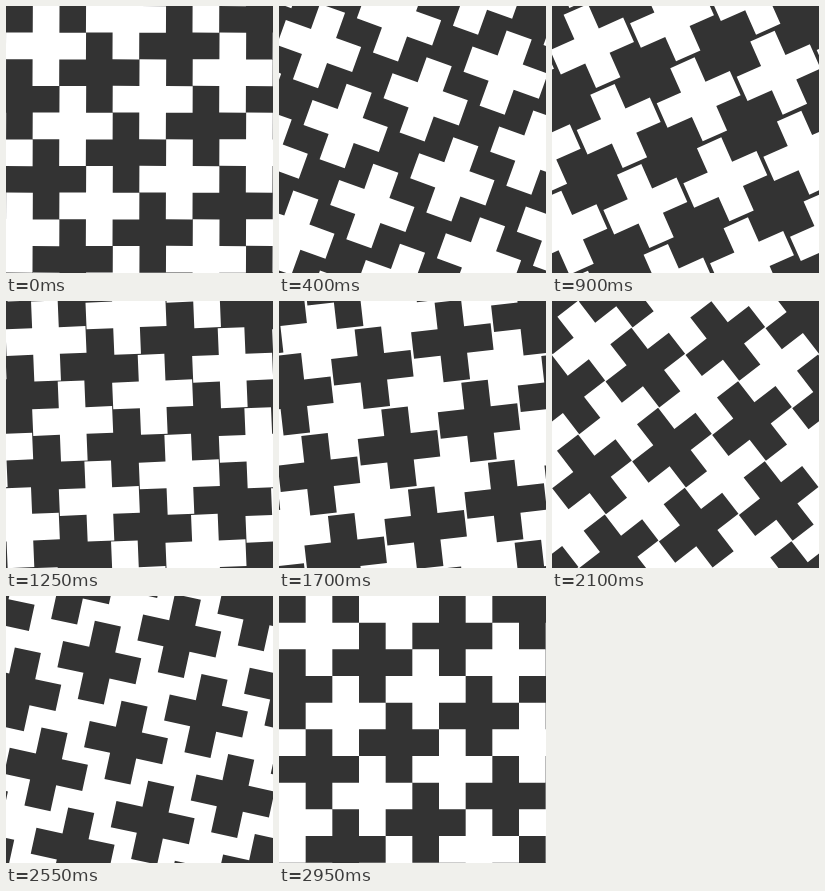
Write an HTML page with a canvas that moves like this. It is 267x267 px and loops after 3000 ms.

```html
<!DOCTYPE html>
<html lang="en">
<head>
<meta charset="utf-8">
<title>Turning crosses</title>
<style>
  html, body { margin: 0; width: 100%; height: 100%; overflow: hidden; background: #333; }
  canvas { display: block; width: 100vw; height: 100vh; }
</style>
</head>
<body>
<canvas id="stage"></canvas>
<script>
const SIZE = 267;
const CELL = 80 / 3;
const STEP_MS = 50;
const STEPS = 30; // per phase
const DARK = '#333333';
const LIGHT = '#ffffff';

// Light crosses turn clockwise, then the dark ones turn back.
const PHASES = [
  { back: DARK, fill: LIGHT, x: 1.5, y: 1.5, turn: 1 },
  { back: LIGHT, fill: DARK, x: 3.5, y: 2.5, turn: -1 }
];

const canvas = document.getElementById('stage');
const ctx = canvas.getContext('2d');

const cross = new Path2D('M-.5-1.5H.5V-.5H1.5V.5H.5V1.5H-.5V.5H-1.5V-.5H-.5Z');
const ease = p => (1 - Math.cos(Math.PI * p)) / 2;

function fit() {
  const ratio = window.devicePixelRatio || 1;
  canvas.width = Math.round(innerWidth * ratio);
  canvas.height = Math.round(innerHeight * ratio);
}

function draw(time) {
  const step = (Math.floor(time / STEP_MS) + 1) % (STEPS * 2);
  const phase = PHASES[Math.floor(step / STEPS)];
  const angle = phase.turn * ease((step % STEPS) / (STEPS - 1)) * Math.PI / 2;

  ctx.setTransform(1, 0, 0, 1, 0, 0);
  ctx.fillStyle = phase.back;
  ctx.fillRect(0, 0, canvas.width, canvas.height);
  ctx.scale(canvas.width / SIZE * CELL, canvas.height / SIZE * CELL);
  ctx.fillStyle = phase.fill;

  // The centres form a lattice spanned by (3, -1) and (1, 3).
  for (let i = -5; i <= 6; i++) {
    for (let j = -5; j <= 6; j++) {
      const x = phase.x + 3 * i + j;
      const y = phase.y - i + 3 * j;
      if (x < -2 || y < -2 || x > 13 || y > 13) continue;
      ctx.save();
      ctx.translate(x, y);
      ctx.rotate(angle);
      ctx.fill(cross);
      ctx.restore();
    }
  }
}

const start = performance.now();

function tick() {
  draw(performance.now() - start);
  requestAnimationFrame(tick);
}

addEventListener('resize', fit);
fit();
tick();
</script>
</body>
</html>
```
